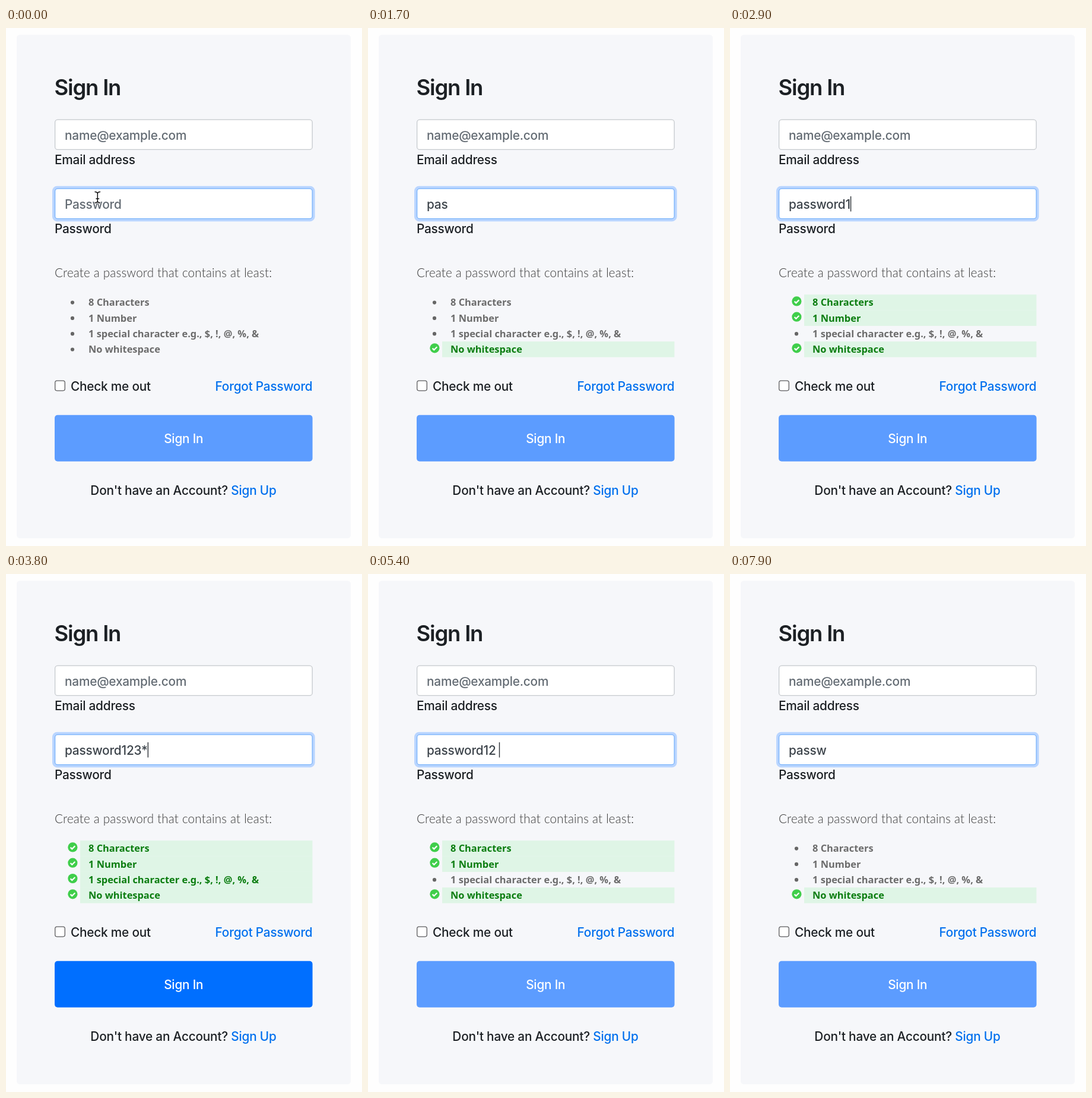
Recreate the animation shown at these times as an HTML page. Size 600 px wide and 871 px high, loop 8 s.

```html
<!DOCTYPE html>
<html lang="en">
<head>
<meta charset="utf-8">
<title>Sign In</title>
<style>
  html, body { margin: 0; width: 100%; height: 100%; overflow: hidden; background: #fefefe; }
  svg { display: block; width: 100%; height: 100%; }
  text { font: 450 20.8px Inter, "Liberation Sans", sans-serif; letter-spacing: -.22px; fill: #1c2024; white-space: pre; }
  .title { font-size: 36.5px; font-weight: 600; letter-spacing: -1.2px; }
  .hint { font: 300 20.6px Lato, "Open Sans", sans-serif; letter-spacing: .19px; fill: #3a3a3a; }
  .rule text { font: 600 16.4px "Noto Sans", "Open Sans", sans-serif; letter-spacing: 0; fill: #6c6c6c; }
  .rule.ok text { fill: #0b7d10; }
  .rule .pass, .rule.ok .dot { display: none; }
  .rule.ok .pass { display: inline; }
  .link { fill: #0070ee; }
  .field { fill: #fff; stroke: #c5c9cd; stroke-width: 1.3; }
</style>
</head>
<body>
<svg viewBox="0 0 600 871">
  <rect x="18" y="11.5" width="563" height="846.5" rx="5" fill="#f6f7fa"/>
  <text class="title" x="81.5" y="113">Sign In</text>

  <rect class="field" x="82.6" y="154.1" width="433.6" height="50.3" rx="4.5"/>
  <text x="99" y="187.5" style="fill:#636b73">name@example.com</text>
  <text x="82" y="229.3">Email address</text>

  <rect x="78" y="265.8" width="442.6" height="59.4" rx="8" fill="#b9d5ff"/>
  <rect class="field" x="82.6" y="270.1" width="433.6" height="50.6" rx="4.5" style="stroke:#78b2fb"/>
  <text id="entry" x="99" y="303.5"></text>
  <rect id="caret" y="283" width="1.4" height="25.5" fill="#2b3035"/>
  <text x="82" y="345.3">Password</text>

  <text class="hint" x="82" y="418.5">Create a password that contains at least:</text>
  <g id="rules"></g>

  <rect x="82.7" y="593.2" width="16.6" height="16.6" rx="3.2" fill="#fff" stroke="#5c5c5e" stroke-width="1.3"/>
  <text x="109" y="610.3">Check me out</text>
  <text class="link" x="516.5" y="610.3" text-anchor="end">Forgot Password</text>

  <rect id="button" x="82" y="650.8" width="434.6" height="78" rx="5"/>
  <text x="299.3" y="698" text-anchor="middle" style="fill:#fff">Sign In</text>
  <text x="299" y="785.3" text-anchor="middle">Don't have an Account? <tspan class="link">Sign Up</tspan></text>

  <g id="pointer" fill="none" stroke-linecap="round">
    <path id="beam" d="M150 275.5Q153.5 275.5 154.3 278Q155 275.5 158.5 275.5M154.3 278V291.5M150 294Q153.5 294 154.3 291.5Q155 294 158.5 294M152 287H156.6" stroke="#fff" stroke-width="3"/>
  </g>
</svg>
<script>
const LOOP = 8000, LAG = 80, BLINK = 500;
const $ = id => document.getElementById(id);

// Field content after each key press
const keys = [
  [100, ""], [900, "p"], [1100, "pa"], [1200, "pas"],
  [1900, "pass"], [2100, "passw"], [2200, "passwo"], [2400, "passwor"], [2600, "password"],
  [2800, "password1"], [3100, "password12"], [3300, "password123"], [3700, "password123*"],
  [4700, "password123"], [4900, "password12"], [5350, "password12 "],
  [6300, "password12"], [6400, "password1"], [6800, "password"],
  [6950, "passwor"], [7100, "passwo"], [7350, "passw"]
];

const rules = [
  ["8 Characters", s => s.length >= 8],
  ["1 Number", s => /\d/.test(s)],
  ["1 special character e.g., $, !, @, %, &", s => /[^\w\s]/.test(s)],
  ["No whitespace", s => s !== "" && !/\s/.test(s)]
];

$("rules").innerHTML = rules.map(([label], i) => `
  <g class="rule" transform="translate(0 ${448.2 + i * 26.3})">
    <rect class="pass" x="125" width="391.5" height="26.4" fill="#dff5e6"/>
    <g class="pass">
      <circle cx="112.4" cy="11.2" r="8.1" fill="#40ce4b"/>
      <path d="M108.6 11.5l2.7 2.7l5-5" fill="none" stroke="#fff" stroke-width="2.2"/>
    </g>
    <circle class="dot" cx="112" cy="13.4" r="3.1" fill="#666"/>
    <text x="139" y="19.2">${label.replace("&", "&amp;")}</text>
  </g>`).join("");
const rows = [...document.querySelectorAll(".rule")];

// Dark core of the pointer, over its white outline
const core = $("beam").cloneNode();
core.removeAttribute("id");
core.setAttribute("stroke", "#111");
core.setAttribute("stroke-width", "1.5");
$("pointer").append(core);

const keyAt = t => keys.reduce((last, key) => key[0] <= t ? key : last, [-1, ""]);
const show = (el, on) => el.setAttribute("visibility", on ? "visible" : "hidden");

function render(t) {
  const [since, value] = keyAt(t);
  const entry = $("entry");
  entry.textContent = value || "Password";
  entry.style.fill = value ? "#3d444b" : "#636b73";

  const width = value ? entry.getComputedTextLength() : 0;
  $("caret").setAttribute("x", 99 + width);
  show($("caret"), since >= 0 && (t - since) % (2 * BLINK) < BLINK);
  show($("pointer"), t < keys[1][0]);

  // Validation follows the typing slightly late
  const checked = keyAt(t - LAG)[1];
  const passed = rules.map(([, test]) => test(checked));
  rows.forEach((row, i) => row.classList.toggle("ok", passed[i]));
  $("button").setAttribute("fill", passed.every(Boolean) ? "#006fff" : "#5c9cff");
}

const start = performance.now();
function tick() {
  render((performance.now() - start) % LOOP);
  requestAnimationFrame(tick);
}
tick();
</script>
</body>
</html>
```
